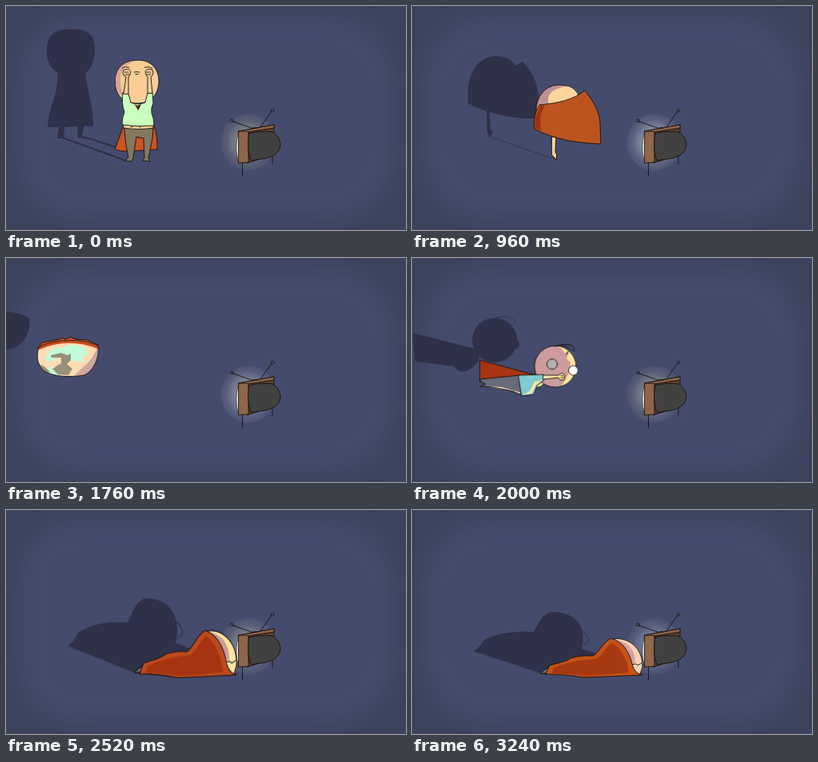
These frames come from a looping animation (500 by 281 pixels, 3.28 s). An HTML page without scripts:

```html
<!DOCTYPE html>
<html lang="en">
<head>
<meta charset="utf-8">
<title>Caped hero and the television</title>
<style>
html, body { margin: 0; width: 100%; height: 100%; overflow: hidden; background: #3c435c; }
svg { display: block; width: 100vw; height: 100vh; animation: light 3.28s step-end infinite; }

/* colours thrown by the flickering screen */
@keyframes light {
  0%, 9.7%, 20%, 46%, 63% {
    --skin: #f8cd96; --shade: #cf9a96; --shirt: #c8ffbd; --cape: #cb5323;
    --dark: #a93c14; --pants: #84785f; --glow: #c6c5ab; --eye: #e6e2d8;
  }
  4.8%, 14.6%, 24%, 31%, 40%, 56%, 70% {
    --skin: #fee9c8; --shade: #eab4b8; --shirt: #d8fcff; --cape: #e6662e;
    --dark: #bd4519; --pants: #96948f; --glow: #d0d1c4; --eye: #fff;
  }
  27%, 35% {
    --skin: #fdd49b; --shade: #bd9092; --shirt: #a9e4dc; --cape: #bd5420;
    --dark: #a2320f; --pants: #716a63; --glow: #dce2e8; --eye: #eee;
  }
  50% {
    --skin: #fddcb4; --shade: #cfa6a0; --shirt: #c2fbd9; --cape: #cd4c1b;
    --dark: #a6390f; --pants: #97907a; --glow: #d2d5dc; --eye: #fff;
  }
  60%, 66%, 75% {
    --skin: #fde4a2; --shade: #cc9c9c; --shirt: #80cbd0; --cape: #bd4a1c;
    --dark: #a63411; --pants: #696b7a; --glow: #c4c4b0; --eye: #b4b1b1;
  }
  79%, 84.5%, 90% {
    --skin: #fbf4d8; --shade: #e6c5cb; --shirt: #c0f2f7; --cape: #e0622b;
    --dark: #cb4613; --pants: #77777b; --glow: #a9aebd; --eye: #fff;
  }
  82%, 87%, 94% {
    --skin: #fbd3b3; --shade: #d3a3a8; --shirt: #a9e4dc; --cape: #c65216;
    --dark: #a73912; --pants: #6a6a72; --glow: #b0b6cd; --eye: #eee;
  }
}

.ink { stroke: #15120f; stroke-width: .9; stroke-linejoin: round; stroke-linecap: round; }
.line { fill: none; }
.shadow { fill: #2e3147; }
.ray { stroke: #2e3147; fill: none; }
.skin { fill: var(--skin); }
.shade { fill: var(--shade); }
.shirt { fill: var(--shirt); }
.cape { fill: var(--cape); }
.dark { fill: var(--dark); }
.pants { fill: var(--pants); }
.white { fill: #fff; }
.eye { fill: var(--eye); }

/* which pose is on stage */
.pose { animation: 3.28s step-end infinite; }
#stand { animation-name: stand; }
#wrap { animation-name: wrap; }
#ball { animation-name: ball; }
#fly { animation-name: fly; }
#lie { animation-name: lie; }
@keyframes stand { 0% { opacity: 1 } 22% { opacity: 0 } }
@keyframes wrap { 0% { opacity: 0 } 22% { opacity: 1 } 35.3% { opacity: 0 } }
@keyframes ball { 0% { opacity: 0 } 35.3% { opacity: 1 } 57.3% { opacity: 0 } }
@keyframes fly { 0% { opacity: 0 } 57.3% { opacity: 1 } 76.8% { opacity: 0 } }
@keyframes lie { 0% { opacity: 0 } 76.8% { opacity: 1 } }

.squat, .rub, .spin, .drift, .swirl, .tip, .settle { animation: 3.28s linear infinite; }

.squat { animation-name: squat; transform-origin: 164px 195px; }
@keyframes squat {
  0%, 18% { transform: none }
  20% { transform: scale(1.04, .93) }
  22%, 100% { transform: scale(.85, .9) }
}
.rub { animation-name: rub; }
@keyframes rub {
  0%, 4.8%, 9.7%, 14%, 100% { transform: none }
  2.4%, 7.3% { transform: translateY(1.5px) }
}
.closed, .open { animation: 3.28s step-end infinite; }
.closed { animation-name: closed; }
.open { animation-name: open; }
@keyframes closed { 0% { opacity: 1 } 9.7% { opacity: 0 } }
@keyframes open { 0% { opacity: 0 } 9.7% { opacity: 1 } }

.spin { animation-name: spin; transform-origin: 194px 150px; }
.shadow-spin { transform-origin: 114px 114px; }
@keyframes spin {
  0%, 22% { transform: translate(-14px, -6px) scaleX(-.8) }
  25.6% { transform: translate(-6px, -3px) scaleX(.55) }
  28.5%, 30% { transform: none }
  32.8% { transform: translate(-30px, 0) scaleX(-.95) }
  35.3%, 100% { transform: translate(-61px, -2px) }
}
.drift { animation-name: drift; }
@keyframes drift {
  0%, 35.3% { transform: translate(55px, 10px) }
  47% { transform: translate(-25px, -5px) }
  53%, 54.8% { transform: none }
  57.3%, 100% { transform: translate(45px, 5px) }
}
.swirl { animation-name: swirl; }
@keyframes swirl {
  0%, 35.3% { transform: translateX(75px) }
  41% { transform: translateX(-75px) }
  41.01% { transform: translateX(75px) }
  47% { transform: translateX(-75px) }
  47.01% { transform: translateX(75px) }
  53%, 54.8% { transform: none }
  57.3%, 100% { transform: translateX(-40px) }
}
.tip { animation-name: tip; transform-origin: 241px 145px; }
.shadow-tip { transform-origin: 165px 112px; }
@keyframes tip {
  0%, 57.3% { transform: translate(-103px, -8px) }
  66.8%, 68.3% { transform: none }
  70.5% { transform: translate(21px, 5px) rotate(6deg) }
  73.5% { transform: translate(21px, 12px) rotate(34deg) }
  76.8%, 100% { transform: translate(18px, 30px) rotate(8deg) }
}
.settle { animation-name: settle; transform-origin: 225px 208px; }
@keyframes settle {
  0%, 76.8% { transform: scaleY(1.22) }
  79.3% { transform: scaleY(.93) }
  81.5%, 100% { transform: none }
}
</style>
</head>
<body>
<svg viewBox="0 0 500 281" preserveAspectRatio="none">
  <defs>
    <filter id="soft" x="-20%" y="-20%" width="140%" height="140%"><feGaussianBlur stdDeviation="14"/></filter>
    <radialGradient id="halo">
      <stop offset="0" stop-color="var(--glow)" stop-opacity=".75"/>
      <stop offset=".45" stop-color="var(--glow)" stop-opacity=".42"/>
      <stop offset=".8" stop-color="var(--glow)" stop-opacity=".14"/>
      <stop offset=".97" stop-color="var(--glow)" stop-opacity=".07"/>
      <stop offset="1" stop-color="var(--glow)" stop-opacity="0"/>
    </radialGradient>
    <path id="bowl" d="M41 112C60 101 95 101 115 110C117 125 110 141 98 147C80 150 60 149 48 142C38 134 38 121 41 112Z"/>
    <clipPath id="bowlClip"><use href="#bowl"/></clipPath>
    <clipPath id="faceClip"><circle cx="242" cy="141" r="26"/></clipPath>
  </defs>

  <rect width="500" height="281" fill="#3c435c"/>
  <rect x="16" y="14" width="468" height="253" rx="75" fill="#454c6d" filter="url(#soft)"/>
  <ellipse cx="303" cy="171" rx="35" ry="36" fill="url(#halo)"/>

  <g id="stand" class="pose">
    <g class="shadow">
      <path d="M51 58C50 38 60 29 80 29C101 28 111 35 111 54C111 70 106 78 99 85C102 105 109 126 109 151L98 150L95 163L102 167L90 165L89 151L73 152L72 166L64 166L66 152L52 152C53 132 61 117 63 104L65 84C56 79 51 70 51 58Z"/>
      <path class="ray" stroke-width="2" d="M70 165L150 194M97 164L150 181"/>
    </g>
    <g class="squat">
      <path class="cape ink" d="M147 150Q141 166 136 180Q144 183 154 182L189 180Q190 165 185 150Z"/>
      <path class="pants ink" d="M148 153L184 153Q184 165 181 176L178 191L180 195L171 194L173 190L172 166L163 164L159 190L157 195L149 194L153 190L150 174Z"/>
      <path class="skin ink" stroke-width=".600" d="M147 148H184V153Q166 156 147 153Z"/>
      <path d="M156 151.500h2M167 152h1" class="ink line" stroke-width=".600"/>
      <path class="skin ink" d="M136.500 97C135 80 146 68 164 68C181 67 191 79 191 94C191 109 183 122 164 122C147 122 137 112 136.500 97Z"/>
      <path class="shade" d="M137 97C137 81 146 70 161 69C147 74 142 83 143 94Q143 106 151 117C143 113 138 107 137 97Z" opacity=".8"/>
      <path class="shirt ink" d="M146 109L153 110L156 121Q165 125 174 121L177 109L183 109L184 122Q181 128 182 134Q185 141 185 150Q165 152 145 149Q145 140 148 133Q144 122 146 109Z"/>
      <path d="M160 123L164 125L169 123L167 128L165 131L163 127Z" fill="#4d2718"/>
      <g class="closed">
        <path class="ink line" stroke-width=".700" d="M145 78Q149 75 154 77M173 77Q178 75 183 78M160 83Q163 82 167 83M162 85.500h3"/>
      </g>
      <g class="open">
        <g class="ink white" stroke-width=".700"><circle cx="149" cy="94" r="7"/><circle cx="179" cy="94" r="7"/></g>
        <path class="ink line" stroke-width=".700" d="M161 98h6M163 99.500h2"/>
      </g>
      <g class="rub ink skin" stroke-width=".700">
        <path d="M147 110L150 89L147 87Q145 83 147 80L153 79L156 82L155 86L153 89L153 110Z"/>
        <path d="M177 109L177 89L175 86L174 82L177 79L183 80Q185 83 183 87L181 89L183 109Z"/>
        <path class="line" d="M148 83h5M149 86h5M176 83h5M176 86h5"/>
      </g>
    </g>
  </g>

  <g id="wrap" class="pose">
    <g class="spin shadow-spin shadow">
      <path d="M70 122C67 88 81 63 105 63C118 63 126 68 129 75L138 70C150 80 158 98 158 116V141C130 143 94 135 70 122Z"/>
      <path d="M93 131L97 132L98 154L101 158L97 165L94 158Z"/>
      <path class="ray" stroke-width=".800" d="M97 164L178 192"/>
    </g>
    <g class="spin">
      <path class="skin ink" d="M175 164L180 165L179 183L181 187L180 193L178 190L175 187Z"/>
      <path class="shade ink" d="M155 131C156 111 168 99 184 99C200 99 209 107 210 124L160 140Z"/>
      <path class="skin" d="M171 124C168 113 173 106 184 103Q193 99 198 102C206 106 209 112 209 121Z"/>
      <path class="cape ink" d="M160 124C181 122 202 118 216 106C226 118 235 134 235 147L236 173C208 172 178 168 153 154C152 142 154 130 160 124Z"/>
      <path class="dark" d="M161 125C155 134 153 144 154 153L162 157Q157 140 166 125Z"/>
    </g>
  </g>

  <g id="ball" class="pose">
    <g class="drift">
      <path class="shadow" d="M-45 78C-30 62 12 64 29 76C32 93 21 113 0 115C-30 117-48 102-45 78Z"/>
      <path class="cape ink" stroke-width=".700" d="M40 113L45 106L67 102L70 100L74 102L81 99L87 102L101 103L115 109L116 115Q77 98 40 113Z"/>
      <use href="#bowl" class="skin"/>
      <g clip-path="url(#bowlClip)">
        <path class="shade" d="M116 108Q109 128 96 137L84 149L111 149L118 126Z"/>
        <g class="swirl">
          <path class="shirt" d="M49 128C50 118 60 111 70 113L77 110L88 109L101 114L102 122L94 124L100 130L83 129L76 121L64 123L61 130Z"/>
          <path class="shirt" d="M41 134L52 139L57 136L70 143L63 149L47 145Z"/>
          <path class="pants" d="M56 122L69 119L77 122L81 120L81 128L76 133L83 139L78 147L65 146L58 139L69 132L69 125L57 125Z"/>
          <path class="pants" d="M40 133L48 136L55 143L48 146Z"/>
        </g>
      </g>
      <path class="cape" d="M41 111Q77 97 115 110L115 114Q78 99 41 115Z"/>
      <use href="#bowl" class="ink line"/>
    </g>
  </g>

  <g id="fly" class="pose">
    <g class="tip shadow-tip shadow">
      <circle cx="166" cy="108" r="28"/><circle cx="191" cy="113" r="6"/>
      <path d="M64 99L142 119L147 132Q135 150 122 147L115 141L66 134Z"/>
      <path class="ray" stroke-width=".800" d="M168 80Q180 76 189 82Q193 85 189 88"/>
    </g>
    <g class="tip">
      <path class="dark ink" d="M148 133L218 152L197 155L148 160Z"/>
      <path class="pants ink" d="M148 157L198 152L200 177L187 172L168 167L148 166L155 163L149 160Z"/>
      <path class="skin" d="M158 165.500L188 171L198 175L198 173.500L175 167Z"/>
      <path class="skin ink" d="M214 160L229 161L224 166L213 169Z"/>
      <circle cx="242" cy="141" r="26" class="shade"/>
      <g clip-path="url(#faceClip)">
        <path class="skin" d="M240 113Q252 118 253 124L259 122L256 131L261 136L259 149L249 167L272 158V112Z"/>
      </g>
      <circle cx="242" cy="141" r="26" class="ink line"/>
      <circle cx="238" cy="138" r="6.500" class="ink eye" stroke-width=".500"/>
      <circle cx="264.500" cy="146" r="6" class="ink white" stroke-width=".600"/>
      <path class="ink line" d="M241 116Q253 111 263 115Q268 119 264 122M247 114Q257 114 262 121M256 126l2-4"/>
      <path class="shirt ink" d="M196 152L227 151L228 158L219 165L215 176L200 178Z"/>
      <path class="skin" d="M202 176.500L212 175L218 164L226 158L216 160L210 172Z"/>
      <path class="skin ink" stroke-width=".800" d="M227 152L246 152L250 149L254 152L253 158L248 158L246 155L227 157Z"/>
      <path class="ink line" stroke-width=".600" d="M249 152l3 1M249 155h3"/>
    </g>
  </g>

  <g id="lie" class="pose">
    <g class="settle">
      <g class="shadow">
        <path d="M77 177Q86 172 90 163C108 154 130 151 152 153C158 143 163 130 174 128C200 127 216 142 214 164L212 174L250 186L205 198L164 206Z"/>
        <path class="ray" d="M210 150Q223 158 220 166L214 170"/>
      </g>
      <path class="skin ink" d="M249 162C270 158 289 173 288 197L285 206L270 204Z"/>
      <path class="shade" d="M255 163C270 165 280 176 279 193L275 192Q270 173 255 163Z"/>
      <path class="ink line" stroke-width=".700" d="M275 194L280 193L282 195L287 192"/>
      <path class="pants ink" stroke-width=".700" d="M161 205Q165 199 173 198L171 204Z"/>
      <path class="cape ink" d="M167 206L172 195C185 191 194 190 198 186Q210 182 226 183C235 178 238 166 249 161C263 165 272 177 276 196Q279 205 288 207Q263 208 241 209L214 210Q193 206 167 206Z"/>
      <path class="dark" d="M174 205L177 198C193 191 209 188 229 187C240 182 241 172 250 167C262 174 269 188 271 204Q243 207 213 208Q195 205 174 205Z"/>
    </g>
  </g>

  <g id="tv" class="ink">
    <path class="line" d="M295.500 197V213M333 186V198M310 154L284 145M318 152L332 132"/>
    <g fill="#555b72"><circle cx="282.500" cy="144" r="1.800"/><circle cx="333" cy="131" r="1.800"/></g>
    <path fill="#e9f7fa" stroke-width=".600" d="M291 158C287 168 287 187 291 196Z"/>
    <path fill="#5d3f2d" d="M291 157L335 149V186L302 197Z"/>
    <path fill="#8f664a" d="M291 157L335 149L335 153L303 158V196L291 197Z"/>
    <path class="line" stroke-width=".800" d="M291 157L303 157.500M307 154Q310 151 314 153"/>
    <path fill="#41413f" d="M304 160C312 157 325 157 333 158C340 162 343 169 343 175C342 184 334 189 325 191L306 194C302 184 302 168 304 160Z"/>
  </g>
</svg>
</body>
</html>
```
